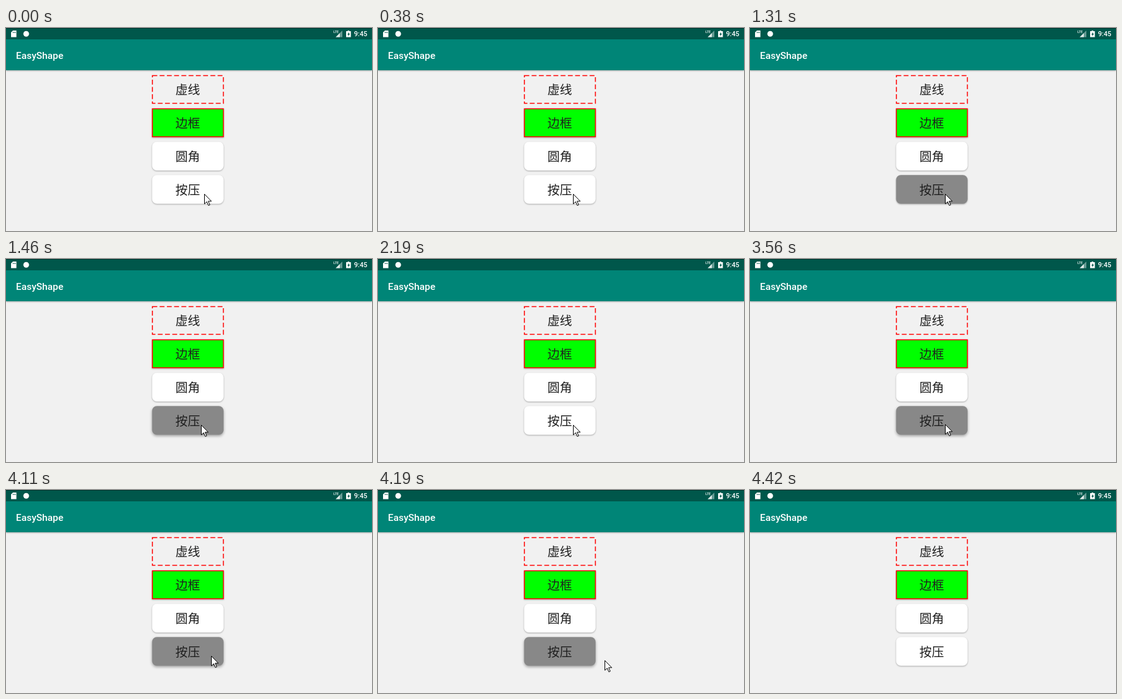
An HTML page that plays this animation: 580 by 322 pixels, repeating every 4.99 s.

```html
<!DOCTYPE html>
<html lang="zh">
<head>
<meta charset="utf-8">
<title>EasyShape</title>
<style>
  html, body { margin: 0; height: 100%; overflow: hidden; background: #f1f1f1; }
  svg { display: block; }
  text { font-family: Roboto, sans-serif; font-weight: 500; fill: #fff; }
  .label text { font: 400 19.5px "Noto Sans CJK SC", "Noto Sans CJK", sans-serif; fill: #1f1f1f; text-anchor: middle; }
  .raised { filter: drop-shadow(0 1px .8px rgba(0, 0, 0, .3)); }
</style>
</head>
<body>
<svg width="580" height="322" viewBox="0 0 580 322">
  <rect width="580" height="322" fill="#f1f1f1"/>
  <rect class="raised" y="18" width="580" height="49" fill="#008577"/>
  <rect width="580" height="18" fill="#00574b"/>
  <rect width="580" height="1" fill="#00332c"/>
  <text x="15.8" y="49" font-size="15.3">EasyShape</text>

  <!-- status bar -->
  <g fill="#fff">
    <path d="M11 4h5.5v10.5h-8.500v-7.500z"/>
    <path d="M11.200 6v2M13 6v2M14.800 6v2" stroke="#00574b" stroke-width=".8"/>
    <circle cx="32" cy="9.300" r="4.500"/>
    <path d="M533 4v10.500h-10.500z" opacity=".4"/>
    <path d="M529 8v6.500h-6.500z" opacity=".8"/>
    <text x="519" y="8" font-size="5">LTE</text>
    <path d="M541.500 4h2.500v1h2.500v9.500h-7.500v-9.500h2.500z"/>
    <path d="M543.500 6.500l-2.500 4h1.500v2.500l2.500-4h-1.500z" fill="#00574b"/>
  </g>
  <text x="551.500" y="13.300" font-size="10.700">9:45</text>

  <!-- buttons -->
  <rect x="232" y="75.500" width="112.500" height="44" fill="none" stroke="#f00" stroke-width="1.500" stroke-dasharray="7.660 3.830"/>
  <rect class="raised" x="232" y="128.200" width="112.500" height="44.300" fill="#0f0" stroke="#f00" stroke-width="1.500"/>
  <rect class="raised" x="231.500" y="180.500" width="113.300" height="45.500" rx="7.500" fill="#fff"/>
  <rect id="press" x="231.500" y="233.300" width="113.300" height="45.500" rx="7.500"/>
  <g class="label">
    <text x="288" y="104.500">虚线</text>
    <text x="288" y="157.500">边框</text>
    <text x="288" y="210.500">圆角</text>
    <text x="288" y="263.500">按压</text>
  </g>
  <path id="cursor" d="M.5.5v15.500l3.700-3.400 2.600 5.900 2.300-1-2.600-5.700h5z" fill="#fff" stroke="#000"/>
</svg>
<script>
const LOOP = 4990, EXIT = 4110;
const press = document.getElementById('press');
const cursor = document.getElementById('cursor');

// press time, time the button lifts, release time
const taps = [[1310, 1460, 2050], [3160, 3280, 4246]];
const FALL = 140;

// start time, x, y
const stops = [[0, 314, 263], [300, 312, 263], [340, 310, 263], [380, 309, 263], [3560, 309, 262]];

function cursorAt(t) {
  if (t < EXIT) return stops.filter(s => s[0] <= t).pop().slice(1);
  const p = Math.floor((t - EXIT) / 28) / 10;
  return [325 + 168 * p, 263 + 56 * p ** 1.3].map(Math.round);
}

function liftAt(t) {
  for (const [, up, end] of taps) {
    if (t >= up && t < end + FALL) return 1 - Math.max(0, t - end) / FALL;
  }
  return 0;
}

function draw() {
  const t = performance.now() % LOOP;
  const down = taps.some(([start, , end]) => t >= start && t < end);
  const lift = liftAt(t);
  press.setAttribute('fill', down ? '#888' : '#fff');
  press.style.filter = `drop-shadow(0 ${1 + lift}px ${0.8 + 1.2 * lift}px rgba(0, 0, 0, ${0.3 + 0.05 * lift}))`;
  const [x, y] = cursorAt(t);
  cursor.setAttribute('transform', `translate(${x} ${y})`);
  cursor.style.display = t < 4400 ? '' : 'none';
  requestAnimationFrame(draw);
}
draw();
</script>
</body>
</html>
```
